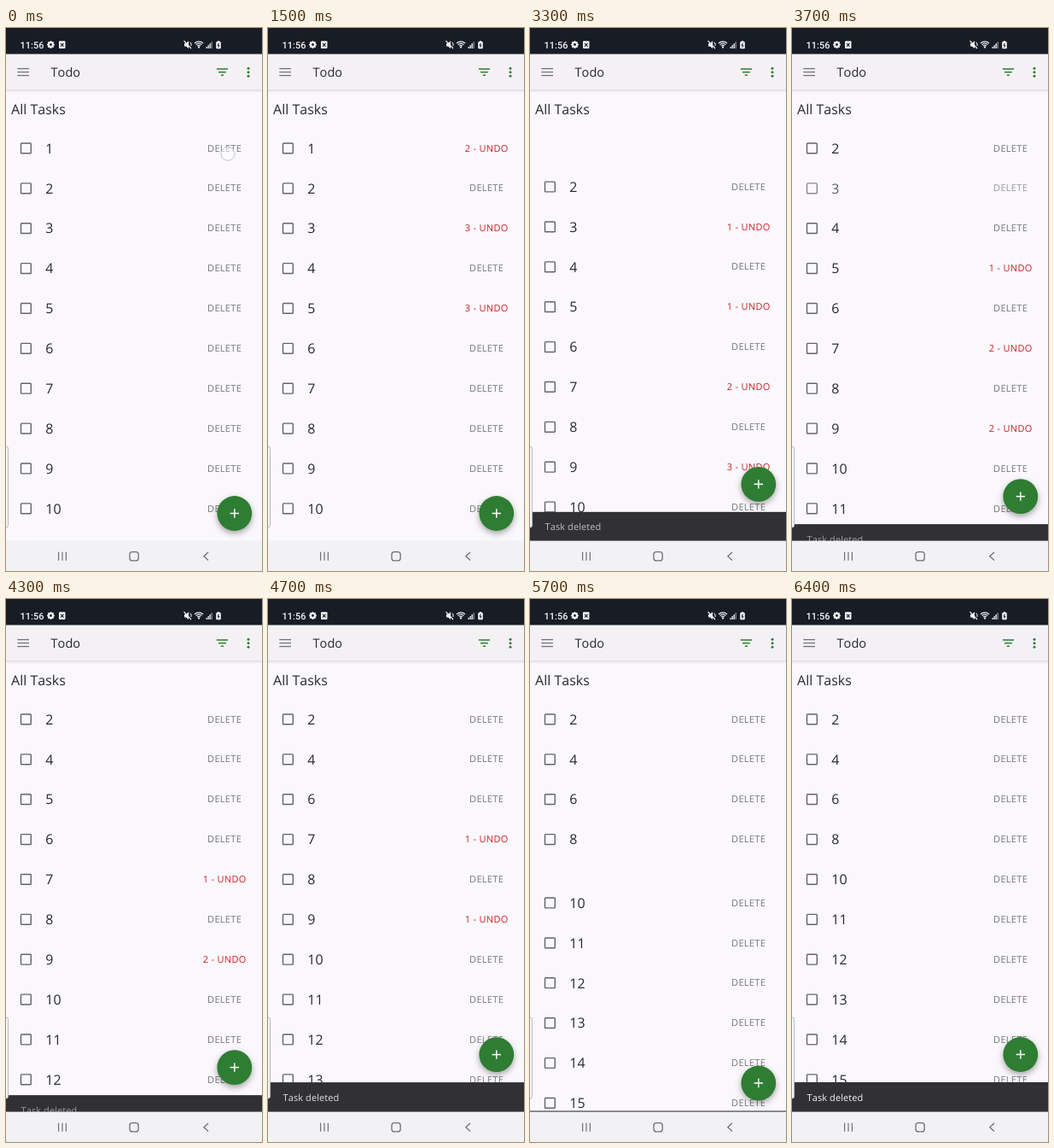
Recreate the animation shown at these times as an HTML page with a canvas. Size 300 by 636 pixels, loop 6.5 s.

```html
<!DOCTYPE html>
<html lang="en">
<head>
<meta charset="utf-8">
<title>Todo list with undo</title>
<style>
  html, body { margin: 0; width: 100%; height: 100%; overflow: hidden; background: #faf8fc; }
  canvas { display: block; width: 300px; height: 636px; }
</style>
</head>
<body>
<canvas id="stage"></canvas>
<script>
const W = 300, H = 636, LOOP = 6.5;
const GREEN = '#2e7d32', RED = '#cb2027', INK = '#29292c';
const ROW_TOP = 140.7, ROW_STEP = 46.88, NAV_TOP = 601, SNACK_HEIGHT = 35;
const COUNTDOWN = 3, SLIDE = 0.25, FADE = 0.12;

// Seconds: when a task is tapped, and how long its row waits before fading out.
const deletions = {
  1: { tap: 0.1, lag: 0.05 },
  3: { tap: 0.62, lag: 0.05 },
  5: { tap: 1.22, lag: 0.09 },
  7: { tap: 1.9, lag: 0.05 },
  9: { tap: 2.42, lag: 0.05 }
};

const canvas = document.getElementById('stage');
const ctx = canvas.getContext('2d');
const ratio = window.devicePixelRatio || 1;
canvas.width = W * ratio;
canvas.height = H * ratio;
ctx.fontKerning = 'none';
ctx.textRendering = 'geometricPrecision';

const clamp = v => Math.max(0, Math.min(1, v));
const easeInOut = p => (1 - Math.cos(Math.PI * clamp(p))) / 2;

// cubic-bezier(.4, 0, .2, 1)
function fastOutSlowIn(p) {
  p = clamp(p);
  let lo = 0, hi = 1;
  for (let i = 0; i < 20; i++) {
    const u = (lo + hi) / 2, v = 1 - u;
    if (1.2 * u * v * v + 0.6 * u * u * v + u * u * u < p) lo = u; else hi = u;
  }
  return lo * lo * (3 - 2 * lo);
}

function rect(x, y, w, h, color) {
  ctx.fillStyle = color;
  ctx.fillRect(x, y, w, h);
}

function line(color, width, ...points) {
  ctx.strokeStyle = color;
  ctx.lineWidth = width;
  ctx.beginPath();
  points.forEach(([x, y]) => ctx.lineTo(x, y));
  ctx.stroke();
}

function disc(x, y, r, color) {
  ctx.fillStyle = color;
  ctx.beginPath();
  ctx.arc(x, y, r, 0, 7);
  ctx.fill();
}

function roundBox(x, y, w, h, r, color, width) {
  ctx.beginPath();
  ctx.roundRect(x, y, w, h, r);
  if (width) {
    ctx.strokeStyle = color;
    ctx.lineWidth = width;
    ctx.stroke();
  } else {
    ctx.fillStyle = color;
    ctx.fill();
  }
}

function text(str, x, y, size, color, { spacing = 0, font = '"Open Sans"', weight = 400 } = {}) {
  ctx.font = `${weight} ${size}px ${font}, sans-serif`;
  ctx.letterSpacing = spacing + 'px';
  ctx.fillStyle = color;
  ctx.fillText(str, x, y);
}

function drawRow(n, y, t) {
  const since = n in deletions ? t - deletions[n].tap : -1;
  roundBox(17.5, y - 5.7, 11.8, 11.8, 0.8, '#646466', 1.4);
  text(String(n), 46.3, y + 6, 16, INK);
  if (since >= 0 && since < COUNTDOWN) {
    text(`${COUNTDOWN - Math.floor(since)} - UNDO`, 230.8, y + 3.9, 11, RED, { spacing: 0.3 });
  } else {
    text('DELETE', 236.1, y + 3.9, 11, '#777779', { spacing: 0.3 });
  }
}

function drawList(t) {
  text('All Tasks', 6, 101, 16, INK);
  let y = ROW_TOP;
  for (let n = 1; y < NAV_TOP + 8; n++) {
    let alpha = 1, collapse = 0;
    if (n in deletions) {
      const { tap, lag } = deletions[n];
      const since = t - tap - COUNTDOWN - lag;
      alpha = 1 - clamp(since / FADE);
      collapse = easeInOut((since - FADE) / SLIDE);
    }
    if (alpha > 0) {
      ctx.globalAlpha = alpha;
      drawRow(n, y, t);
      ctx.globalAlpha = 1;
    }
    y += ROW_STEP * (1 - collapse);
  }
}

function drawTouch(t) {
  for (const [n, { tap }] of Object.entries(deletions)) {
    if (t < tap - 0.13 || t >= tap) continue;
    const y = ROW_TOP + (n - 1) * ROW_STEP + 6.5;
    disc(260, y, 8, 'rgba(255,255,255,.55)');
    ctx.strokeStyle = '#c4c4c6';
    ctx.lineWidth = 1;
    ctx.beginPath();
    ctx.arc(260, y, 8, 0, 7);
    ctx.stroke();
  }
}

// Each deletion slides the previous message out, then the new one in.
function snackState(t) {
  const past = Object.values(deletions).map(d => d.tap + COUNTDOWN).filter(s => s <= t);
  if (!past.length) return { height: 0, alpha: 0 };
  const since = t - past[past.length - 1];
  if (past.length > 1 && since < SLIDE) {
    return { height: SNACK_HEIGHT * (1 - fastOutSlowIn(since / SLIDE)), alpha: 1 - clamp(since / 0.18) };
  }
  const entering = past.length > 1 ? since - SLIDE : since;
  return { height: SNACK_HEIGHT * fastOutSlowIn(entering / SLIDE), alpha: clamp((entering - 0.07) / 0.18) };
}

function drawSnackAndFab(t) {
  const { height, alpha } = snackState(t);
  const top = NAV_TOP - height;
  if (height > 0) {
    rect(0, top, W, height, '#313033');
    ctx.globalAlpha = alpha;
    text('Task deleted', 17.5, top + 21.6, 11, '#f4f4f4', { spacing: 0.1 });
    ctx.globalAlpha = 1;
  }
  const y = 568.5 - height;
  ctx.save();
  ctx.shadowColor = 'rgba(0,0,0,.35)';
  ctx.shadowBlur = 7 * ratio;
  ctx.shadowOffsetY = 3 * ratio;
  disc(267.8, y, 20.4, GREEN);
  ctx.restore();
  line('#fff', 1.5, [262.6, y], [273, y]);
  line('#fff', 1.5, [267.8, y - 5.2], [267.8, y + 5.2]);
}

function drawStatusBar() {
  const white = '#f4f5f7', dark = '#171c25';
  rect(0, 0, W, 30.5, dark);
  text('11:56', 16.5, 23.6, 11, white, { font: 'Roboto', weight: 500 });

  for (let i = 0; i < 8; i++) {
    const a = i * Math.PI / 4, c = Math.cos(a), s = Math.sin(a);
    line(white, 1.8, [52.5, 19.5], [52.5 + 4.4 * c, 19.5 + 4.4 * s]);
  }
  disc(52.5, 19.5, 3.4, white);
  disc(52.5, 19.5, 1.4, dark);

  roundBox(62, 15.2, 7.5, 8.8, 1, white);
  line(dark, 1.1, [64, 17.8], [67.6, 21.6]);
  line(dark, 1.1, [67.6, 17.8], [64, 21.6]);

  ctx.fillStyle = white;
  ctx.beginPath();
  [[209, 18], [211, 18], [214, 15], [214, 24], [211, 21.5], [209, 21.5]].forEach(p => ctx.lineTo(...p));
  ctx.fill();
  line(white, 1.1, [208.5, 15], [217, 24]);
  line(white, 1, [215.5, 16.5], [217, 18], [217, 21]);

  ctx.strokeStyle = white;
  ctx.lineWidth = 1.2;
  for (const r of [2.6, 4.9, 7.2]) {
    ctx.beginPath();
    ctx.arc(226, 23, r, -Math.PI * 0.75, -Math.PI * 0.25);
    ctx.stroke();
  }
  disc(226, 22.6, 1.1, white);
  [2, 4, 6, 8].forEach((h, i) => rect(234.5 + i * 2, 24 - h, 1.3, h, i < 3 ? white : '#8b8f96'));
  roundBox(246.2, 16, 5.6, 8.2, 1, white);
  rect(247.8, 15, 2.4, 1.4, white);
  line(dark, 1, [249.6, 17.6], [248, 20.3], [250, 20.3], [248.5, 22.8]);
}

function drawAppBar() {
  const shade = ctx.createLinearGradient(0, 72, 0, 76);
  shade.addColorStop(0, 'rgba(0,0,0,.11)');
  shade.addColorStop(1, 'rgba(0,0,0,0)');
  rect(0, 72, W, 4, shade);
  rect(0, 30, W, 42, '#f3f1f4');
  for (const y of [47.6, 51.6, 55.6]) line('#737375', 1.3, [13.3, y], [27, y]);
  text('Todo', 52.5, 57, 14.6, INK);
  line(GREEN, 1.5, [246.8, 48], [260, 48]);
  line(GREEN, 1.5, [249, 51.7], [257.8, 51.7]);
  line(GREEN, 1.5, [251.8, 55.3], [255, 55.3]);
  for (const y of [47.2, 51.7, 56.2]) disc(284, y, 1.5, GREEN);
}

function drawNavBar() {
  const color = '#707072';
  rect(0, NAV_TOP - 0.4, W, H - NAV_TOP + 1, '#f2f1f3');
  for (const x of [61.6, 66, 70.4]) line(color, 1.2, [x, 613.8], [x, 623.8]);
  roundBox(145, 613.7, 10.2, 10.2, 3, color, 1.3);
  line(color, 1.3, [237, 614], [231.8, 618.8], [237, 623.6]);
}

function drawEdgeHandle() {
  roundBox(-4, 490, 6.6, 95, 2.5, '#f4f3f5');
  roundBox(-4, 490, 6.6, 95, 2.5, '#b5b5b7', 0.9);
}

function draw(t) {
  ctx.setTransform(ratio, 0, 0, ratio, 0, 0);
  rect(0, 0, W, H, '#faf8fc');
  drawList(t);
  drawTouch(t);
  drawSnackAndFab(t);
  drawAppBar();
  drawStatusBar();
  drawNavBar();
  drawEdgeHandle();
}

const start = performance.now();
function frame() {
  draw((performance.now() - start) / 1000 % LOOP);
  requestAnimationFrame(frame);
}
frame();
</script>
</body>
</html>
```
